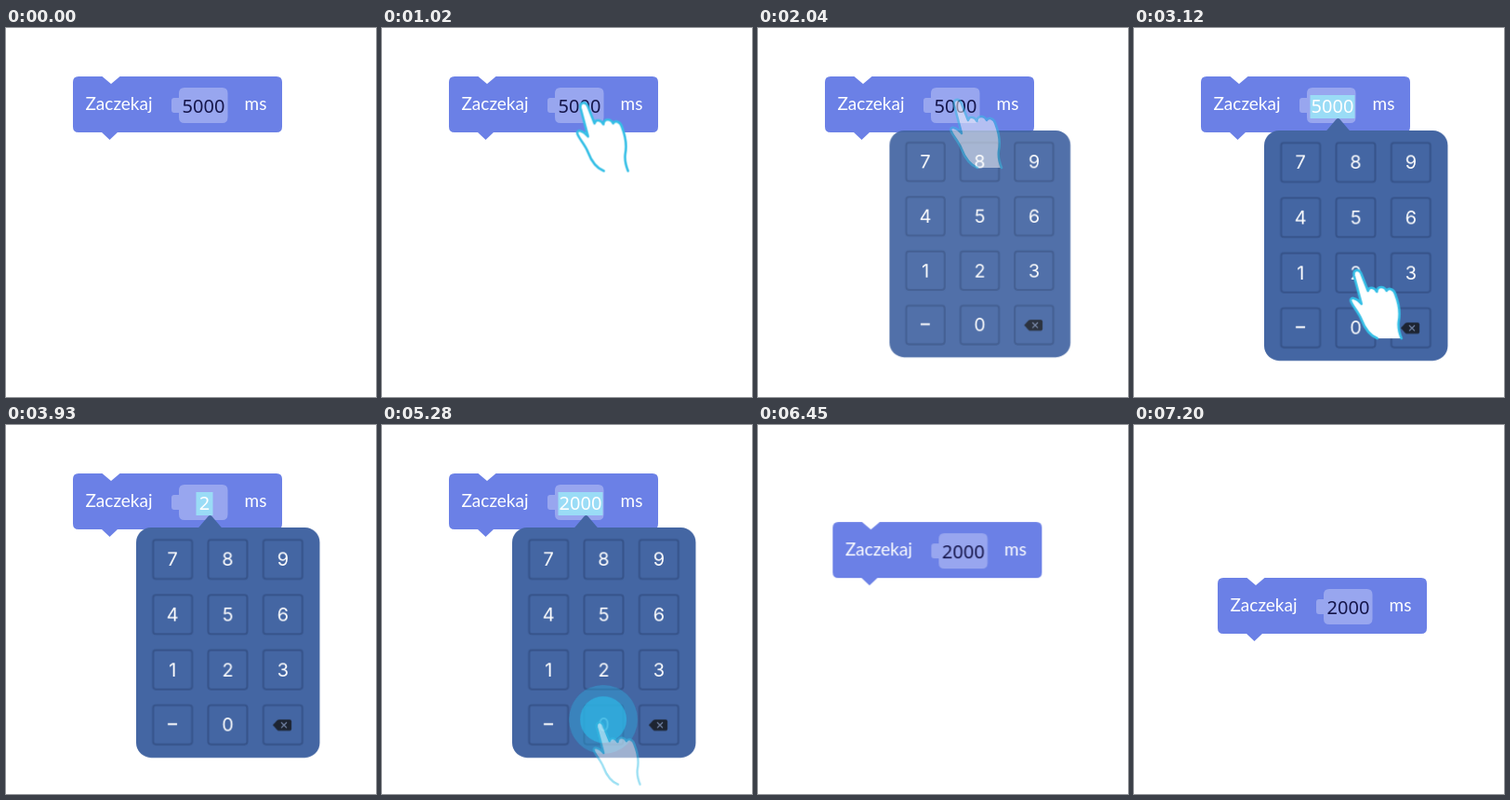
An HTML page for the animation above (8000 ms loop, 398x396 px).

```html
<!DOCTYPE html>
<html lang="pl">
<head>
<meta charset="utf-8">
<title>Zaczekaj</title>
<style>
html, body { margin: 0; width: 100%; height: 100%; overflow: hidden; background: #fff; }
svg { display: block; }
#stage { width: 100%; height: 100%; }

.block, .values, .lit, .dark, .pad, .hand, .press, .ripple {
  animation: 8s linear infinite both;
}
.block { animation-name: settle; }
.values { animation-name: typing; animation-timing-function: step-end; }
.lit { animation-name: lit; }
.dark { animation-name: dark; }
.pad { animation-name: pad; transform-origin: 238.5px 110px; }
.hand { animation-name: travel, show; }
.press { animation-name: press; transform-origin: 234px 113px; animation-timing-function: ease-in-out; }
.ripple { animation-name: ripple; animation-delay: var(--at); }

.label { font: 19px Lato, sans-serif; fill: #fff; }
.values text { font: 20px "Noto Sans", sans-serif; text-anchor: middle; }
.values .lit text { fill: #fff; }
.values .dark { fill: #15154a; }
.keys text { font: 20px Inter, sans-serif; fill: #fff; text-anchor: middle; }
.keys rect { fill: #4466a3; stroke: #37548b; stroke-width: 2; }

@keyframes settle {
  0%, 76.5% { transform: none; animation-timing-function: cubic-bezier(.455, .03, .515, .955); }
  85.25%, 100% { transform: translate(18px, 112px); }
}
@keyframes typing {
  0% { transform: translateY(0); }
  42.75% { transform: translateY(-100px); }
  54% { transform: translateY(-200px); }
  59.375% { transform: translateY(-300px); }
  64.75%, 100% { transform: translateY(-400px); }
}
@keyframes lit {
  0%, 30.375% { opacity: 0; }
  33.75%, 73.125% { opacity: 1; }
  79.2%, 100% { opacity: 0; }
}
@keyframes dark {
  0%, 30.375% { opacity: 1; }
  33.75%, 73.125% { opacity: 0; }
  79.2%, 100% { opacity: 1; }
}
@keyframes pad {
  0%, 22.5% { opacity: 0; transform: scale(.6); }
  25.5% { opacity: .93; transform: scale(.985); }
  27% { opacity: 1; transform: scale(1.025); animation-timing-function: ease-in-out; }
  30%, 73.125% { opacity: 1; transform: none; }
  79.2%, 100% { opacity: 0; transform: none; }
}
@keyframes travel {
  0%, 5.5% { transform: translate(34px, 45px); animation-timing-function: ease-in-out; }
  14.5%, 28% { transform: none; }
  28.01%, 36% { transform: translate(50px, 193px); animation-timing-function: ease-out; }
  41.25%, 48.5% { transform: translate(18px, 180px); }
  48.51%, 100% { transform: translate(18px, 239px); }
}
@keyframes show {
  0%, 5.5% { opacity: 0; }
  9.5%, 23.5% { opacity: 1; }
  27.5%, 36% { opacity: 0; }
  39%, 45.5% { opacity: 1; }
  48%, 49.5% { opacity: 0; }
  52%, 65% { opacity: 1; }
  67%, 100% { opacity: 0; }
}
@keyframes press {
  0%, 15.5%, 19.5%, 41.625%, 45.625%, 52.875%, 56.875%, 58.25%, 62.25%, 63.625%, 68%, 100% { transform: none; }
  16.75%, 18%, 42.875%, 44.125%, 54.125%, 55.375%, 59.5%, 60.75%, 64.875%, 66.5% { transform: scale(.91); }
}
@keyframes ripple {
  0% { opacity: 0; transform: scale(.5); }
  1.25% { opacity: 1; transform: scale(.85); }
  2.4% { opacity: .97; transform: none; }
  4%, 100% { opacity: 0; transform: scale(1.18); }
}
</style>
</head>
<body>
<svg id="stage" viewBox="0 0 398 396">
  <g class="block">
    <path fill="#6b80e6" d="M78 52H103.500L113 60L122.500 52H291Q297 52 297 58V106Q297 112 291 112H120L111.500 120L103 112H78Q72 112 72 106V58Q72 52 78 52Z"/>
    <text class="label" x="85.500" y="88">Zaczekaj</text>
    <text class="label" x="256.500" y="88">ms</text>
    <path fill="#98a6ef" d="M192 64H232.500Q238.500 64 238.500 70V96Q238.500 102 232.500 102H192Q186 102 186 96V91H181Q178 91 178 88V78Q178 75 181 75H186V70Q186 64 192 64Z"/>
    <svg x="178" y="64" width="61" height="38" viewBox="178 64 61 38">
      <g class="values"></g>
    </svg>
  </g>

  <path class="lit" fill="#4466a3" d="M207 110.200L217.500 98Q219.500 96 221.500 98L232 110.200Z"/>
  <g class="pad">
    <rect x="140" y="110" width="197.500" height="247" rx="16" fill="#4466a3"/>
    <g class="keys"></g>
    <path stroke="#fff" stroke-width="2" d="M174 321H184"/>
    <path fill="#1d2431" d="M287 322L292 316.500Q292.800 316 294 316H305Q307 316 307 318V326Q307 328 305 328H294Q292.800 328 292 327.500Z"/>
    <path stroke="#7486a8" stroke-width="1.200" d="M296 319L302 325M302 319L296 325"/>
  </g>

  <g class="ripples"></g>
  <g class="hand" fill="#fff" stroke-linejoin="round" stroke-linecap="round">
    <g class="press">
      <path id="palm" stroke="#35bfe6" stroke-width="2.600" d="M236 150C226 146 222 138 219 130C216 122 209 115 207.500 110C206.500 105 213 106 219 113L211 83C209.500 76 216 75 218.500 80L226 99C227 94 233 95 235.500 100C236 94 243 93 246 99C248 95 254 97 255.500 103C259 112 261 122 259 132C258 140 260 145 262 150"/>
    </g>
  </g>
</svg>
<script>
const NS = "http://www.w3.org/2000/svg";

function add(parent, tag, attrs, text) {
  const node = document.createElementNS(NS, tag);
  for (const name in attrs) node.setAttribute(name, attrs[name]);
  if (text) node.textContent = text;
  return parent.appendChild(node);
}

const values = document.querySelector(".values");
const widths = { 1: 18, 2: 26, 3: 37, 4: 48 };
["5000", "2", "20", "200", "2000"].forEach((value, i) => {
  const width = widths[value.length];
  const slot = add(values, "g", { transform: `translate(0 ${i * 100})` });
  add(slot, "text", { class: "dark", x: 212.5, y: 90.5 }, value);
  const lit = add(slot, "g", { class: "lit" });
  add(lit, "rect", { x: 213.5 - width / 2, y: 72, width, height: 25, fill: "#9adcf6" });
  add(lit, "text", { x: 213.5, y: 91 }, value);
});

const keys = document.querySelector(".keys");
[..."789456123", "", "0", ""].forEach((digit, i) => {
  const x = 179.2 + (i % 3) * 59.3;
  const y = 144.2 + Math.floor(i / 3) * 59.2;
  add(keys, "rect", { x: x - 21, y: y - 21, width: 42, height: 42, rx: 3 });
  if (digit) add(keys, "text", { x, y: y + 7.2 }, digit);
});

// Tap time in ms, then the centre of its ripple
const taps = [[1240, 218, 84], [3330, 238, 257], [4230, 238, 316], [4660, 238, 316], [5090, 238, 316]];
const ripples = document.querySelector(".ripples");
for (const [at, x, y] of taps) {
  const spot = add(ripples, "g", { transform: `translate(${x} ${y})` });
  const ripple = add(spot, "g", { class: "ripple", style: `--at: ${at}ms`, fill: "#2fb4e4" });
  add(ripple, "circle", { r: 37, opacity: 0.4 });
  add(ripple, "circle", { r: 25, opacity: 0.78 });
}
</script>
</body>
</html>
```
